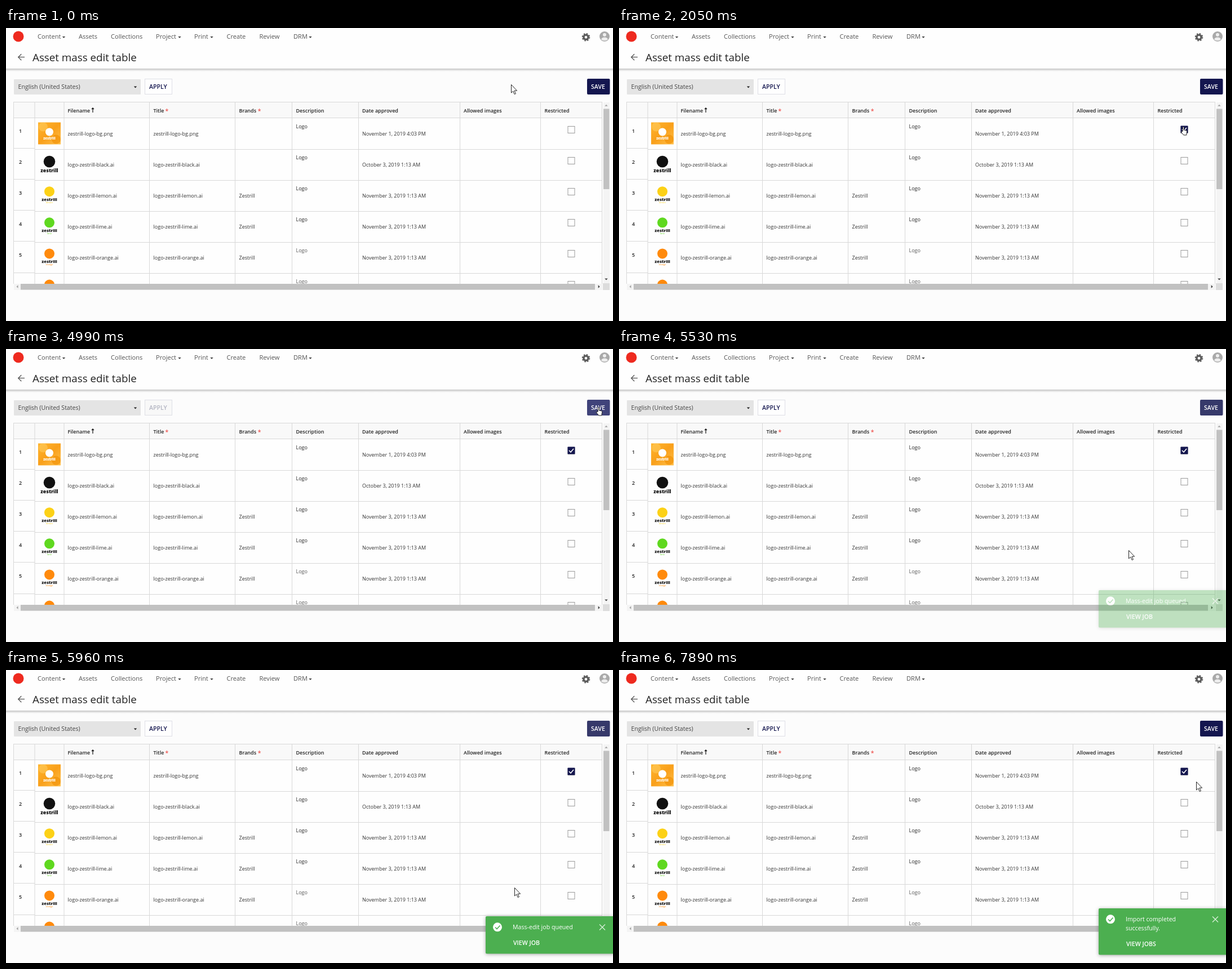
An HTML page for the animation above (8 s loop, 1077x520 px).

```html
<!DOCTYPE html>
<html lang="en">
<head>
<meta charset="utf-8">
<title>Asset mass edit table</title>
<style>
  html, body { margin: 0; width: 100%; height: 100%; overflow: hidden; background: #fcfcfc; }
  svg { display: block; font: 9px "Open Sans", sans-serif; }
  .toast { filter: drop-shadow(0 1px 3px #0005); }
</style>
</head>
<body>
<svg id="stage" width="1077" height="520" viewBox="0 0 1077 520"></svg>
<script>
const NAVY = '#14164f', LINE = '#d8d8d8';
const BRAND = 'Zestrill', brand = 'zestrill';

const text = (x, y, str, size = 9, fill = '#333', weight = 400, extra = '') =>
  `<text x="${x}" y="${y}" font-size="${size}" fill="${fill}" font-weight="${weight}" ${extra}>${str}</text>`;
const rect = (x, y, w, h, fill, extra = '') =>
  `<rect x="${x}" y="${y}" width="${w}" height="${h}" fill="${fill}" ${extra}/>`;
const circle = (x, y, r, fill, extra = '') =>
  `<circle cx="${x}" cy="${y}" r="${r}" fill="${fill}" ${extra}/>`;
const path = (d, fill, extra = '') => `<path d="${d}" fill="${fill}" ${extra}/>`;
const stroke = (d, color, width = 1, extra = '') =>
  path(d, 'none', `stroke="${color}" stroke-width="${width}" ${extra}`);
const caret = (x, y, fill = '#444') => path(`M${x - 2.7} ${y}h5.4l-2.7 3z`, fill);

function topBar() {
  const items = [['Content', 56, 102.5], ['Assets', 129], ['Collections', 186], ['Project', 266, 308],
    ['Print', 334, 365], ['Create', 391.5], ['Review', 449.5], ['DRM', 510, 540]];
  return rect(0, 0, 1077, 73, '#fefefe') + rect(0, 72, 1077, 5, 'url(#edge)') +
    circle(22, 15, 9.5, '#ee2a1f') +
    items.map(([name, x, arrow]) =>
      text(x, 19.3, name, 11.1, '#555') + (arrow ? caret(arrow, 15) : '')).join('') +
    circle(1029, 16.3, 4.1, 'none', 'stroke="#5c5c5c" stroke-width="3.4"') +
    circle(1029, 16.3, 6.2, 'none', 'stroke="#5c5c5c" stroke-width="2.2" stroke-dasharray="2.435"') +
    circle(1062, 15, 9, '#a9a9a9') + circle(1062, 12, 3, '#eee') +
    path('M1056 20.5q1-4 6-4t6 4q-6 4-12 0z', '#eee') +
    stroke('M33 51.7H22M27.3 46.2l-5.6 5.5 5.6 5.5', '#555', 1.3) +
    text(47, 58.5, 'Asset mass edit table', 18.8, '#222');
}

function toolbar() {
  return rect(14, 91, 225, 27, '#e4e4e4', 'rx="1"') +
    text(21.5, 108, 'English (United States)', 10.6, '#444') + caret(229.5, 103.5, '#222') +
    rect(246.5, 90.5, 48, 27, '#fefefe', 'id="applyBox" stroke="#dedfe6"') +
    text(254, 108, 'APPLY', 10.6, NAVY, 600, 'id="apply"') +
    rect(1031, 90, 40.5, 28, NAVY, 'id="save" rx="2"') +
    text(1038, 108, 'SAVE', 10.6, '#fff', 600);
}

function thumbnail(row, y) {
  const word = (size, baseline, fill) =>
    text(77, baseline, brand, size, fill, 800, 'text-anchor="middle"');
  if (row === 0)
    return rect(57, y + 8, 40, 39, 'url(#photo)') + circle(66, y + 16, 8, '#ffc95a', 'opacity=".6"') +
      circle(89, y + 38, 8, '#f08c00', 'opacity=".6"') +
      circle(77, y + 25, 7, '#fff') + word(6, y + 38, '#fff');
  if (row === 1) return circle(77, y + 22.5, 10.3, '#111') + word(8.8, y + 41, '#111');
  const [color, flavour] = [['#fcd116', 'lemon'], ['#5fd81f', 'lime'], ['#ff8a0c', 'orange'],
    ['#ff8a0c', 'orange']][row - 2];
  return circle(77, y + 20.5, 9, color) + word(7.7, y + 37, '#111') +
    text(77, y + 41, flavour, 4, color, 400, 'text-anchor="middle"');
}

function table() {
  const files = [brand + '-logo-bg.png',
    ...['black', 'lemon', 'lime', 'orange', 'peach'].map(f => `logo-${brand}-${f}.ai`)];
  const dates = ['November 1, 2019 4:03 PM', 'October 3, 2019 1:13 AM'];
  const heads = [['Filename', 109.5], ['Title', 261.5], ['Brands', 413.5], ['Description', 514.5],
    ['Date approved', 632], ['Allowed images', 812], ['Restricted', 955.5]];

  let out = rect(14, 131, 1044, 323, '#fefefe') + rect(14, 131, 1044, 28, '#f9f9f9');
  files.forEach((file, row) => {
    const y = 159.5 + row * 55.1, base = y + 31.3;
    out += thumbnail(row, y) + text(23, 186 + row * 54.9, row + 1, 9, '#222', 600) +
      text(109.5, base, file) + text(261.5, base, file) +
      (row > 1 ? text(413.5, base, BRAND) : '') +
      text(514.5, 177.7 + row * 55, 'Logo', 9, row < 4 ? '#222' : '#555', row < 4 ? 500 : 400) +
      text(632, base, dates[row] || 'November 3, 2019 1:13 AM') +
      rect(997, Math.round(y + 14) + .5, 12, 12, '#fff', 'stroke="#999"') +
      stroke(`M51 ${Math.round(y + 55)}.5H1058`, LINE) +
      stroke(`M14 ${Math.round(y + 53.6)}.5H51`, LINE);
  });
  out += stroke('M13 131.5H1058M13 159.5H1058', LINE) +
    [13.5, 51, 103, 254.5, 406.5, 507.5, 625.5, 805.5, 948.5, 1057.5]
      .map(x => stroke(`M${x} 131V454`, LINE)).join('') +
    heads.map(([name, x]) => text(x, 149.5, name, 9, '#222', 600)).join('') +
    stroke('M154 150v-8M152 144.2l2-2.2 2 2.2', '#111', 1.2) +
    text(282.5, 150.5, '*', 10.5, '#f0544f', 600) + text(446.7, 150.5, '*', 10.5, '#f0544f', 600);
  return `<g clip-path="url(#tableClip)">${out}</g>`;
}

function scrollbars() {
  return rect(1060, 132, 11, 321, '#f4f4f4') + rect(1060, 143.5, 10.5, 142.5, '#c1c1c1') +
    path('M1062.3 138.7h5.4l-2.7-3z', '#a3a3a3') + path('M1062.3 444.5h5.4l-2.7 3z', '#444') +
    rect(14, 454, 1044, 11, '#f4f4f4') + rect(26, 454, 1019, 10.5, '#c1c1c1') +
    path('M21.5 456.3v5.4l-3-2.7z', '#a3a3a3') + path('M1050.7 456.3v5.4l3-2.7z', '#444') +
    rect(1059, 453, 12, 12, '#dcdcdc');
}

function toast(id, height, lines, action) {
  return `<g id="${id}" class="toast">` + rect(851, 0, 228, height, '#4caf50', 'rx="2"') +
    circle(872, 19.3, 8, '#fff') + stroke('M868 19.5l3 3 5.5-6', '#4caf50', 1.6) +
    lines.map((line, i) => text(899, 23.3 + 16 * i, line, 10.6, '#fff')).join('') +
    text(900, height - 16, action, 10.6, '#fff', 600) +
    stroke('M1053 14.5l10 10m0-10l-10 10', '#d9f0da', 1.3) + '</g>';
}

stage.innerHTML = `<defs>
  <linearGradient id="edge" x2="0" y2="1"><stop stop-color="#c4c4c4"/><stop offset="1" stop-color="#fcfcfc"/></linearGradient>
  <linearGradient id="photo" x2="1" y2="1"><stop stop-color="#ffb52e"/><stop offset=".5" stop-color="#f9a01b"/><stop offset="1" stop-color="#ffc04a"/></linearGradient>
  <clipPath id="tableClip"><rect x="13" y="131" width="1045" height="323"/></clipPath></defs>` +
  topBar() + toolbar() + table() + scrollbars() +
  `<g id="checked">${rect(996.5, 173.5, 13, 13, NAVY, 'rx="1"')}${stroke('M999 180l3 3 5-6', '#fff', 1.6)}</g>` +
  toast('queued', 66.5, ['Mass-edit job queued'], 'VIEW JOB') +
  toast('done', 82.5, ['Import completed', 'successfully.'], 'VIEW JOBS') +
  path('M.5 .5V15l3.3-3 2.4 5.6 2.2-1-2.4-5.4h4.6z', '#fff', 'id="arrow" stroke="#222"') +
  path('M3.3 8V1.6a1.1 1.1 0 0 1 2.2 0V6l4 .9q1.5.5 1.3 2L10 12.5V15H4.8L.9 10.2q-.8-1.7 1-1.7z',
    '#fff', 'id="hand" stroke="#222"');

// Pointer steps: time, x, y, hand?
const pointer = [[0, 896, 100], [430, 902, 102], [610, 915, 111], [730, 937, 127], [850, 954, 142],
  [970, 973, 157], [1100, 989, 168], [1220, 998, 173], [1340, 997, 175, 1], [2300, 1002, 178],
  [2420, 1016, 183], [2540, 1025, 184], [2690, 1026, 184], [3530, 1035, 168], [3650, 1043, 133],
  [3800, 1050, 120], [3950, 1048, 107, 1], [4100, 1048, 104, 1], [4220, 1047, 103, 1],
  [5290, 1025, 150], [5410, 945, 290], [5530, 904, 357], [5690, 902, 386], [6110, 893, 394],
  [6230, 870, 410], [6380, 461, 472], [7340, 1034, 279], [7620, 1022, 240], [7740, 1024, 214],
  [7890, 1024, 198]];
// Toast steps: time, top, opacity
const queuedSteps = [[0, 0, 0], [5410, 427, .1], [5530, 428, .35], [5690, 432, .7], [5840, 435.5, .93],
  [5960, 437, 1], [6110, 437, .6], [6230, 437, 0]];
const doneSteps = [[0, 0, 0], [6110, 419, .5], [6230, 422, .9], [6380, 423, 1]];
const saveSteps = [[0, NAVY], [3950, '#36396a'], [4750, '#40437a'], [5290, '#36396a'], [7190, NAVY]];
const applySteps = [[0, NAVY, '#fefefe'], [4990, '#b3b5c2', '#f8f8f8'], [5140, '#c0c1cc', '#f8f8f8'],
  [5290, NAVY, '#fefefe']];

const at = (steps, t) => steps.findLast(step => step[0] <= t);
const place = (el, x, y, opacity) => {
  el.setAttribute('transform', `translate(${x} ${y})`);
  el.setAttribute('opacity', opacity);
};
const el = id => document.getElementById(id);
const [arrow, hand, queued, done, save, apply, applyBox, checked] =
  ['arrow', 'hand', 'queued', 'done', 'save', 'apply', 'applyBox', 'checked'].map(el);

function draw() {
  const t = performance.now() % 8000;
  const [, x, y, isHand] = at(pointer, t);
  place(arrow, x, y, isHand ? 0 : 1);
  place(hand, x, y, isHand ? 1 : 0);
  for (const [node, steps] of [[queued, queuedSteps], [done, doneSteps]]) {
    const [, top, opacity] = at(steps, t);
    place(node, 0, top, opacity);
  }
  checked.setAttribute('opacity', t >= 2050 ? 1 : 0);
  save.setAttribute('fill', at(saveSteps, t)[1]);
  const [, ink, paper] = at(applySteps, t);
  apply.setAttribute('fill', ink);
  applyBox.setAttribute('fill', paper);
  requestAnimationFrame(draw);
}
draw();
</script>
</body>
</html>
```
